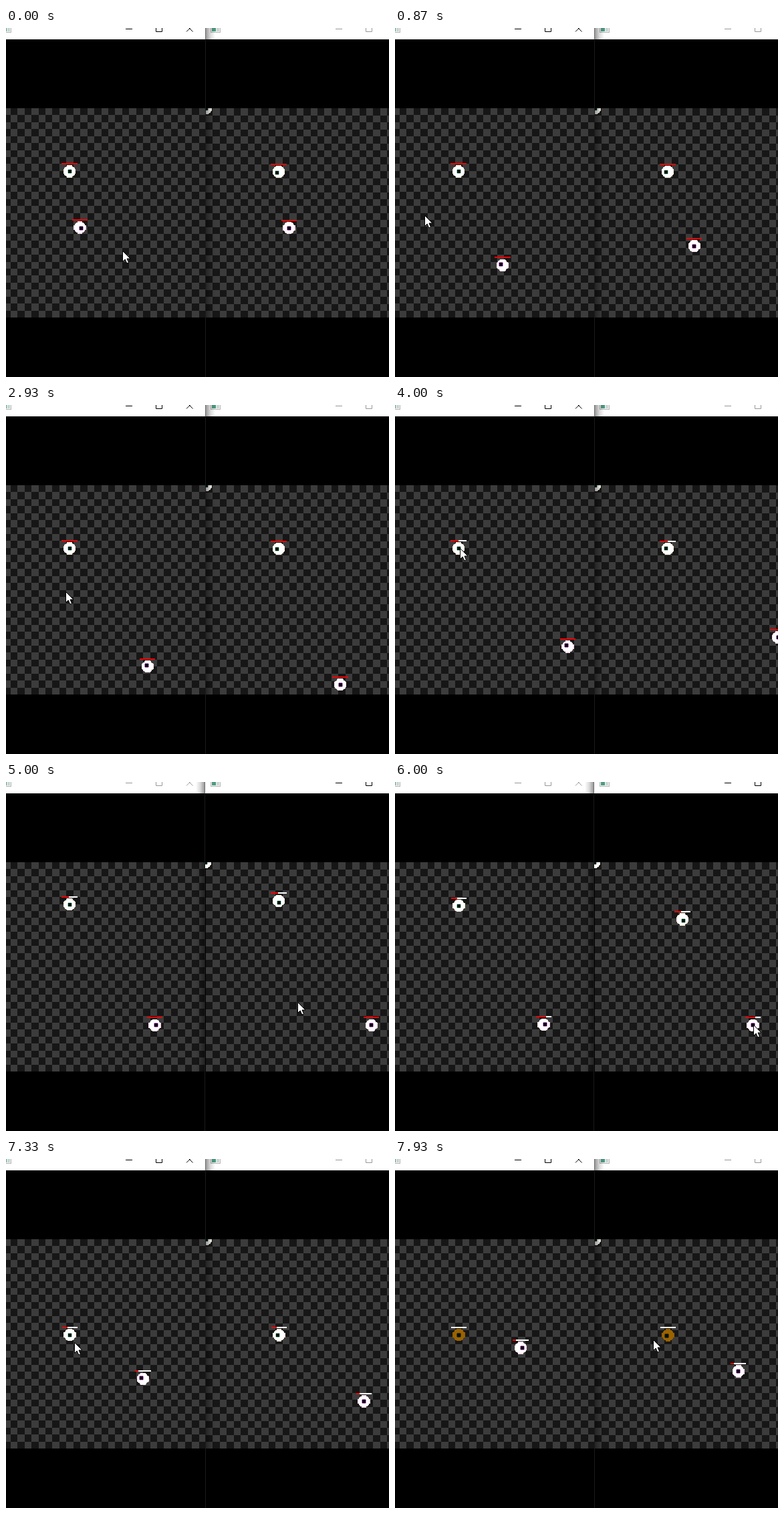
Write an HTML page with a canvas that moves like this. It is 573 px wide and 522 px high and loops after 8 s.

```html
<!DOCTYPE html>
<html lang="en">
<head>
<meta charset="utf-8">
<title>Two game windows</title>
<style>
  html, body { margin: 0; width: 100%; height: 100%; overflow: hidden; background: #000; }
  canvas { display: block; }
</style>
</head>
<body>
<canvas id="stage" width="573" height="522"></canvas>
<script>
const ctx = document.getElementById('stage').getContext('2d');
const LOOP = 8000, TICK = 200 / 3, LAG = 450;
const UNIT = 313 / 240, CELL = UNIT * 8;
const RIGHT_SHIFT = 313;
const FOCUS_RIGHT = 4700, FOCUS_LEFT = 6600, DEATH = 7670;

// Key points [time, value...]; players in left-window coordinates.
const cursorKeys = [
  [0, 174, 333], [600, 26, 282], [1670, 143, 267], [2600, 83, 274], [2930, 89, 279],
  [3530, 97, 214], [4330, 97, 214], [5300, 536, 363], [6000, 536, 363],
  [6900, 102, 274], [7330, 102, 274], [7930, 386, 270]
];
const greenKeys = [
  [4050, 95, 214.5], [4650, 95, 177], [5400, 95, 178], [5550, 95.5, 185],
  [6000, 117, 205], [6500, 103, 244], [6880, 95.5, 263]
];
const pinkKeys = [
  [0, 110.5, 298.5], [870, 161, 355], [1670, 162, 410.5], [2480, 187, 418],
  [2930, 211.5, 391.5], [3550, 260, 347], [4000, 258.5, 361.5], [4800, 222.5, 364],
  [6930, 222.5, 362], [7330, 205, 329], [7930, 188, 282.5]
];
const greenHealth = [[3000, 1], [3700, .5], [6000, .4], [7400, .33], [DEATH, 0]];
const pinkHealth = [[5200, 1], [6000, .66], [7000, .22]];

const GREEN = { body: '#fff', edge: '#fff1df', ring: '#a9d3bf', pupil: '#001a10' };
const PINK = { body: '#fff', edge: '#ffe0ee', ring: '#c27fc8', pupil: '#16001a' };
const DEAD = { body: '#9a6300', edge: '#945e00', ring: '#493900', pupil: '#001007' };

const linear = k => k;
const smooth = k => k * k * (3 - 2 * k);

function along(keys, t, ease = linear) {
  const next = keys.findIndex(key => key[0] > t);
  if (next === 0) return keys[0].slice(1);
  if (next < 0) return keys[keys.length - 1].slice(1);
  const a = keys[next - 1], b = keys[next];
  const k = ease((t - a[0]) / (b[0] - a[0]));
  return a.slice(1).map((value, i) => value + (b[i + 1] - value) * k);
}

function rect(color, x, y, w, h) {
  ctx.fillStyle = color;
  ctx.fillRect(x, y, w, h);
}

function crispRect(color, x, y, w, h) {
  const left = Math.round(x), top = Math.round(y);
  rect(color, left, top, Math.round(x + w) - left, Math.round(y + h) - top);
}

function checker(x0, y0) {
  for (let row = 0; row < 30; row++)
    for (let col = 0; col < 40; col++)
      crispRect((row + col) % 2 ? '#3c3c3c' : '#161616', x0 + col * CELL, y0 + row * CELL, CELL, CELL);
}

function gazeAt([x, y], [tx, ty]) {
  const distance = Math.hypot(tx - x, ty - y) || 1;
  return [(tx - x) / distance * 2.3, (ty - y) / distance * 2.3];
}

function eye([x, y], look, [dx, dy] = [0, 0]) {
  for (let row = -7; row < 7; row++) {
    const half = Math.round(Math.sqrt(49 - (row + .5) ** 2));
    const top = y + row * UNIT;
    crispRect(look.edge, x - half * UNIT, top, half * 2 * UNIT, UNIT);
    if (row > -7 && row < 6)
      crispRect(look.body, x - (half - 1) * UNIT, top, (half - 1) * 2 * UNIT, UNIT);
  }
  const px = x + dx, py = y + dy;
  crispRect(look.ring, px - 3.5, py - 2.5, 7, 5);
  crispRect(look.ring, px - 2.5, py - 3.5, 5, 7);
  crispRect(look.pupil, px - 2.5, py - 2.5, 5, 5);
}

function player(position, look, health, gaze) {
  const [x, y] = position, width = 18 * UNIT, left = x - width / 2;
  eye(position, look, gaze);
  crispRect('#fff', left, y - 12.5, width, 2);
  crispRect('#f00000', left, y - 12.5, width * health, 2);
}

function buttons(x, active, withClose) {
  ctx.strokeStyle = active ? '#000' : '#999';
  ctx.lineWidth = 1;
  ctx.beginPath();
  ctx.moveTo(x, 1.5);
  ctx.lineTo(x + 10, 1.5);
  ctx.rect(x + 45.5, -3.5, 9, 9);
  if (withClose) {
    ctx.moveTo(x + 91, -4);
    ctx.lineTo(x + 100.5, 5.5);
    ctx.moveTo(x + 100.5, -4);
    ctx.lineTo(x + 91, 5.5);
  }
  ctx.stroke();
}

function appIcon(x) {
  rect('#b4b4b4', x, -5, 15, 12);
  rect('#f4f4f4', x + 1, 0, 13, 6);
  rect('#4c9a83', x + 2, 0, 6, 5);
  rect('#c8d8d4', x + 9, 0, 4, 5);
}

function shadow(from, to) {
  const fade = ctx.createLinearGradient(from, 0, to, 0);
  fade.addColorStop(0, 'rgba(0,0,0,.4)');
  fade.addColorStop(.5, 'rgba(0,0,0,.14)');
  fade.addColorStop(1, 'rgba(0,0,0,0)');
  rect(fade, Math.min(from, to), 0, Math.abs(to - from), 522);
}

function clipped(x, y, w, h, paint) {
  ctx.save();
  ctx.beginPath();
  ctx.rect(x, y, w, h);
  ctx.clip();
  paint();
  ctx.restore();
}

function drawCursor([x, y]) {
  ctx.save();
  ctx.translate(Math.round(x) + .5, Math.round(y) + .5);
  ctx.beginPath();
  [[0, 0], [0, 16], [3.7, 12.5], [6.3, 18.5], [9, 17.3], [6.5, 11.5], [11.5, 11.5]]
    .forEach(([px, py]) => ctx.lineTo(px, py));
  ctx.closePath();
  ctx.fillStyle = '#fff';
  ctx.strokeStyle = '#000';
  ctx.lineWidth = 1;
  ctx.fill();
  ctx.stroke();
  ctx.restore();
}

function draw(t) {
  const rightActive = t >= FOCUS_RIGHT && t < FOCUS_LEFT;
  const border = rightActive ? 297 : 298;
  const rightEdge = border + 1;
  const greenLook = t >= DEATH ? DEAD : GREEN;
  const [hpGreen] = along(greenHealth, t);
  const [hpPink] = along(pinkHealth, t);
  const cursor = along(cursorKeys, t, smooth);
  const inRight = ([x, y]) => [x + RIGHT_SHIFT, y + .5];

  // Each window sees one of the players late.
  const greenLeft = along(greenKeys, t - LAG);
  const greenRight = inRight(along(greenKeys, t));
  const pinkLeft = along(pinkKeys, t);
  const pinkRight = inRight(along(pinkKeys, t - LAG));

  rect('#000', 0, 0, 573, 522);
  rect('#fff', 0, 0, 573, 17);

  clipped(0, 120, border, 313, () => {
    checker(299 - RIGHT_SHIFT, 120);
    player(greenLeft, greenLook, hpGreen);
    player(pinkLeft, PINK, hpPink, gazeAt(pinkLeft, cursor));
  });
  clipped(rightEdge, 120, 573 - rightEdge, 314, () => {
    checker(299, 120.4);
    eye([rightEdge, 120], GREEN);
    player(greenRight, greenLook, hpGreen, gazeAt(greenRight, cursor));
    player(pinkRight, PINK, hpPink);
  });

  appIcon(-7);
  appIcon(306);
  buttons(179, !rightActive, true);
  buttons(493, rightActive, false);

  if (rightActive) shadow(297, 284);
  else shadow(299, 313);
  rect('#1b1b1b', border, 17, 1, 505);
  rect('#6e6e6e', border, 0, 1, 17);
  drawCursor(cursor);
}

const start = performance.now();
function frame(now) {
  const t = Math.max(0, now - start) % LOOP;
  draw(Math.floor((t + 4) / TICK) * TICK);
  requestAnimationFrame(frame);
}
draw(0);
requestAnimationFrame(frame);
</script>
</body>
</html>
```
